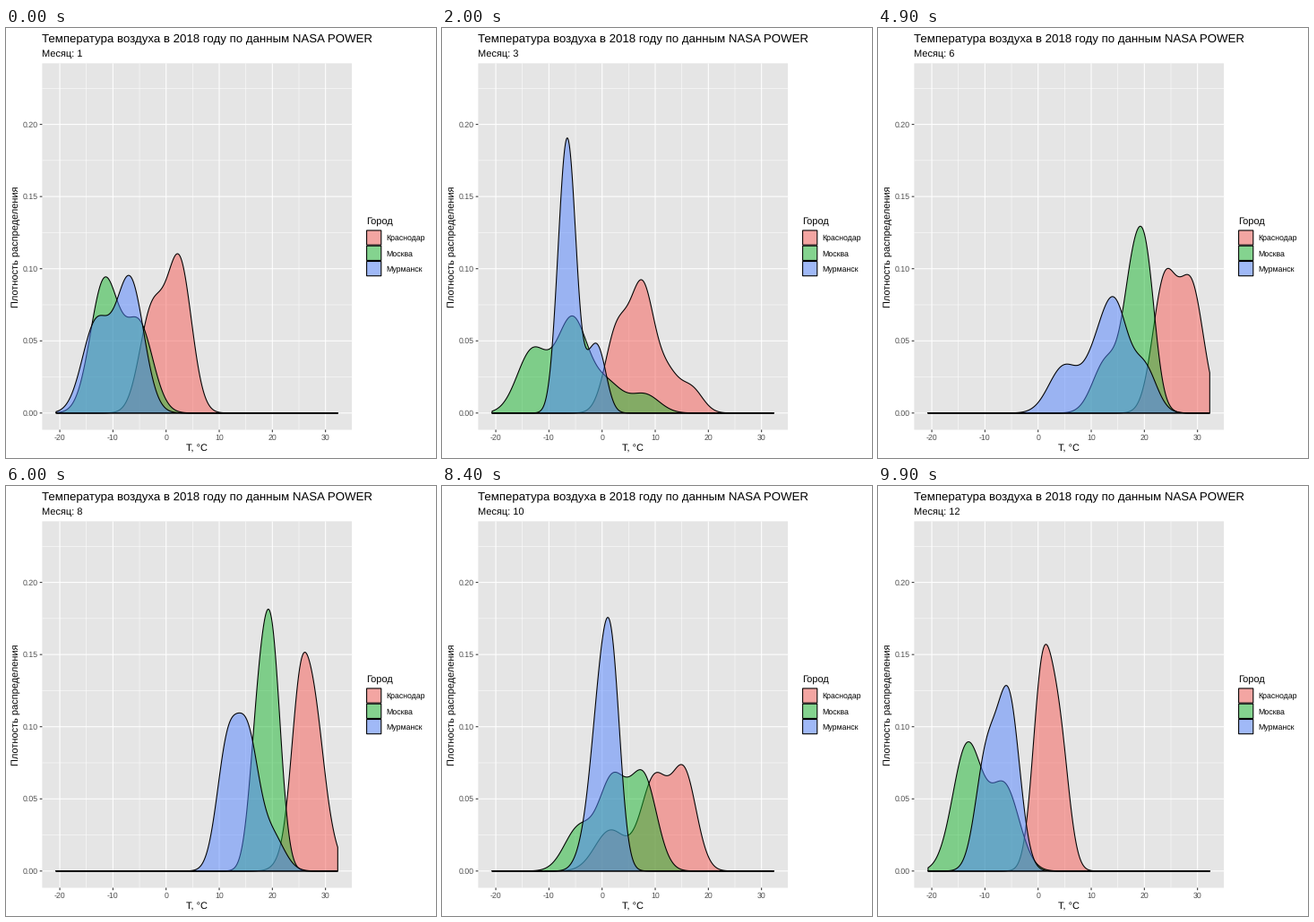
Write a matplotlib script that moves like this. It is 480 by 480 pixels and loops after 10 s.

```python
import numpy as np
import matplotlib.pyplot as plt
from matplotlib.animation import FuncAnimation
from matplotlib.patches import Polygon, Rectangle

plt.rcParams.update({"font.family": "Liberation Sans", "text.hinting": "none",
                     "path.snap": False})

SIZE, DPI = 480, 72
FRAMES, INTERVAL = 100, 100
LEFT, RIGHT, TOP, BOTTOM = 40.4, 386.1, 39.4, 448.5
T_MIN, T_MAX = -20.7, 32.3
ALPHA = 0.5
THIN, THICK = 0.53, 1.07

# Name, colour, usual temperature by month, and how far off the side peak lies.
CITIES = [
    ("Краснодар", (247, 91, 85),
     [2.5, 3, 7.6, 12.3, 21.2, 23.6, 29.3, 25.3, 21.5, 15.4, 1.5, .8],
     [-5.2, -4.5, -4.8, 4.5, -3.6, 4.8, -5, 2.6, -4.5, -5.4, 7.5, 3.2]),
    ("Москва", (25, 183, 47),
     [-11.6, -9, -5.6, 1, 15.8, 18.8, 20.4, 19.8, 16.3, 7.8, -4.4, -13.3],
     [6.5, -5, -7.5, 7, -3.6, -6, -2.8, -2.5, -5.5, -6, 6.8, 7]),
    ("Мурманск", (81, 131, 255),
     [-6.8, -13, -6, -.5, 6.5, 12, 15, 11.5, 9, 1.9, 1.3, -5.5],
     [-6.4, 5, -1.6, -2, -5.4, -7.2, 5, 4, -3.4, -2.4, -3.6, -4.2]),
]

temps = np.linspace(T_MIN, T_MAX, 512)


def px(t):
    return 178.7 + 5.932 * t


def py(d):
    return 429.8 - 1611 * d


def bell(mean, spread):
    z = (temps - mean) / spread
    return np.exp(-z * z / 2) / (spread * np.sqrt(2 * np.pi))


def density(peak, gap):
    """Main and side bell; months with distant peaks are broader."""
    spread = 1 + abs(gap) / 4
    return 0.6 * bell(peak, spread) + 0.4 * bell(peak + gap, spread)


fig = plt.figure(figsize=(SIZE / DPI, SIZE / DPI), dpi=DPI, facecolor="white")
ax = fig.add_axes([0, 0, 1, 1])
ax.set_xlim(0, SIZE)
ax.set_ylim(SIZE, 0)
ax.axis("off")


def line(xs, ys, color, width):
    ax.plot(xs, ys, color=color, lw=width, zorder=1, solid_capstyle="butt")


def vline(t, width):
    line([px(t)] * 2, [TOP, BOTTOM], "white", width)


def hline(d, width):
    line([LEFT, RIGHT], [py(d)] * 2, "white", width)


def label(x, y, text, size, color="black", **kw):
    return ax.text(x, y, text, fontsize=size, color=color, va="baseline", **kw)


def box(x, y, w, h, fill, **kw):
    ax.add_patch(Rectangle((x, y), w, h, fc=fill, **kw))


def rgba(rgb):
    return tuple(c / 255 for c in rgb) + (ALPHA,)


# Panel, grid and axes
box(LEFT, TOP, RIGHT - LEFT, BOTTOM - TOP, "#E5E5E5", ec="none", zorder=0)
for t in range(-15, 30, 10):
    vline(t, THIN)
for d in np.arange(0.025, 0.23, 0.05):
    hline(d, THIN)
for t in range(-20, 31, 10):
    vline(t, THICK)
    line([px(t)] * 2, [BOTTOM, BOTTOM + 2.7], "#333333", THICK)
    label(px(t), 460, str(t), 8.8, "#4D4D4D", ha="center")
for d in np.arange(0, 0.21, 0.05):
    hline(d, THICK)
    line([LEFT - 2.7, LEFT], [py(d)] * 2, "#333333", THICK)
    label(35.6, py(d) + 3.1, f"{d:.2f}", 8.8, "#4D4D4D", ha="right")

label(40.4, 15, "Температура воздуха в 2018 году по данным NASA POWER", 13.2)
month_label = label(40.4, 32, "", 11)
label((LEFT + RIGHT) / 2, 473, "T, °C", 11, ha="center")
label(13.3, (TOP + BOTTOM) / 2, "Плотность распределения", 11,
      ha="center", rotation=90, rotation_mode="anchor")

# Legend and density areas
label(401.8, 219, "Город", 11)
areas, curves = [], []
for k, (name, rgb, peaks, gaps) in enumerate(CITIES):
    y = 225.4 + 17.28 * k
    box(402, y, 17.28, 17.28, "#F0F0F0", ec="none", zorder=2)
    box(402.6, y + 0.55, 16.2, 16.2, rgba(rgb), ec="black", lw=THICK, zorder=3)
    label(424.5, y + 11.8, name, 8.8)
    curves.append([density(p, g) for p, g in zip(peaks, gaps)])
    areas.append(ax.add_patch(Polygon(
        np.zeros((3, 2)), fc=rgba(rgb), ec="black", lw=THICK,
        joinstyle="round", zorder=4 + k)))

outline_x = px(np.concatenate([temps, temps[::-1]]))
baseline = np.zeros_like(temps)


def update(i):
    pos = 11 * i / (FRAMES - 1)
    m = min(int(pos), 10)
    f = pos - m
    for area, c in zip(areas, curves):
        d = (1 - f) * c[m] + f * c[m + 1]
        area.set_xy(np.column_stack([outline_x, py(np.concatenate([d, baseline]))]))
    month_label.set_text(f"Месяц: {round(pos) + 1}")
    return [*areas, month_label]


anim = FuncAnimation(fig, update, frames=FRAMES, interval=INTERVAL,
                     repeat=True, repeat_delay=0, blit=False)
plt.show()
```
